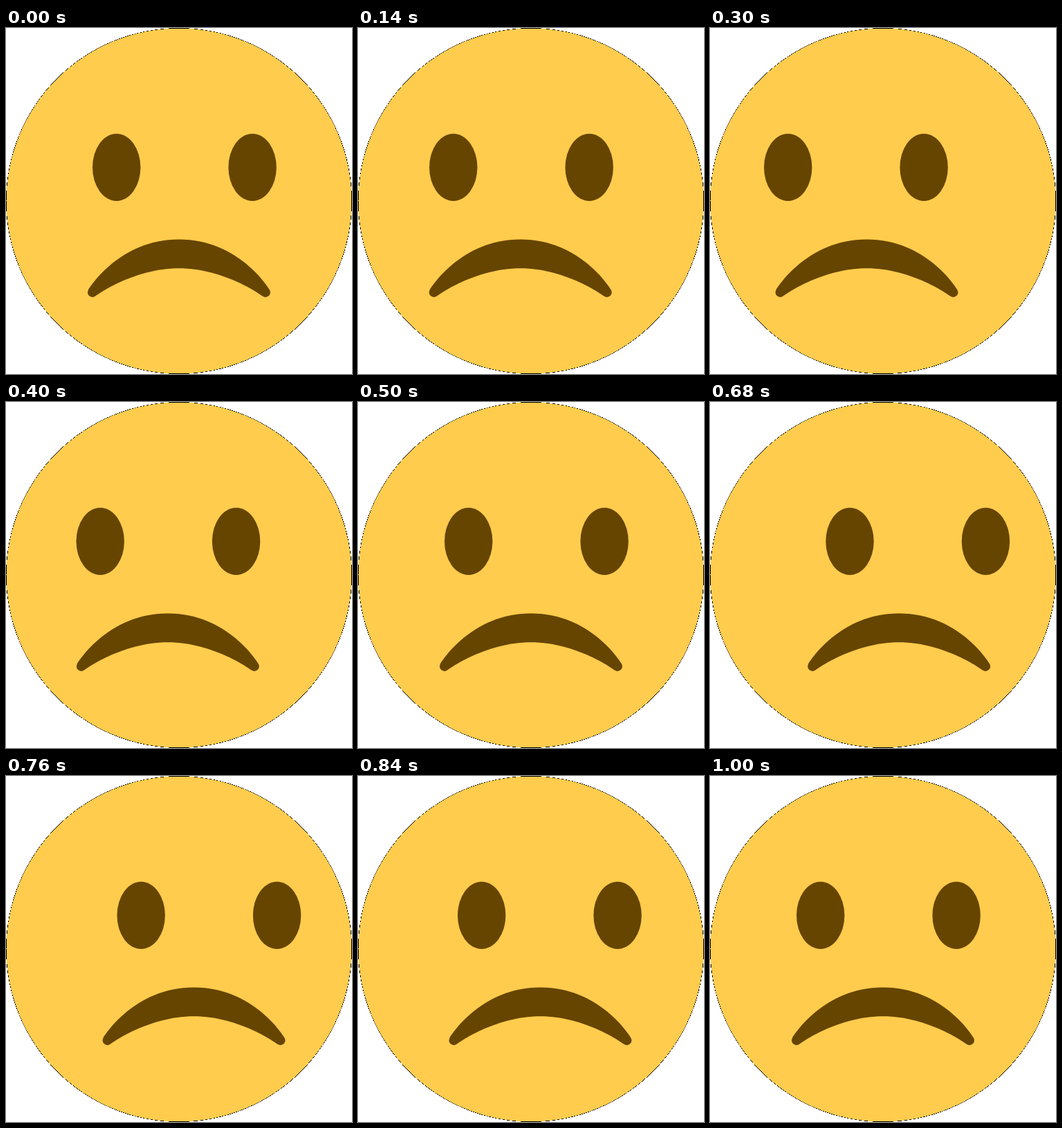
An HTML page for the animation above (2420 ms loop, 500x500 px).

```html
<!DOCTYPE html>
<html lang="en">
<head>
<meta charset="utf-8">
<title>Frowning face shaking its head</title>
<style>
  html, body { margin: 0; width: 100%; height: 100%; overflow: hidden; background: #fff; }
  svg { display: block; width: 100%; height: 100%; }
</style>
</head>
<body>
<svg viewBox="0 0 500 500">
  <g shape-rendering="crispEdges">
    <circle cx="250" cy="250" r="250"/>
    <circle cx="250" cy="250" r="249.5" fill="#ffcc4d"/>
  </g>
  <g fill="#664500">
    <g id="eyes">
      <ellipse cx="159.7" cy="201.4" rx="34.7" ry="48.6"/>
      <ellipse cx="356.1" cy="201.4" rx="34.7" ry="48.6"/>
    </g>
    <g id="mouth">
      <path transform="scale(13.889)" d="M8.665 27.871c.178.161.444.171.635.029
        .039-.029 3.922-2.9 8.7-2.9 4.766 0 8.662 2.871 8.7 2.9
        .191.142.457.13.635-.029.177-.16.217-.424.094-.628
        C27.3 27.029 24.212 22 18 22s-9.301 5.028-9.429 5.243
        c-.123.205-.084.468.094.628z"/>
    </g>
  </g>
</svg>
<script>
  const LOOP = 2420, STEP = 20;
  const EYE_SWING = 47, MOUTH_SWING = 23.5;
  const eyes = document.getElementById('eyes');
  const mouth = document.getElementById('mouth');

  // Head turn: -1 is fully left, 1 is fully right.
  function turnAt(ms) {
    if (ms < 300) return -ms / 300;
    if (ms < 700) return (ms - 500) / 200;
    if (ms >= 1000) return 0;
    const p = (ms - 700) / 300;
    return 1 - (1.1 * p + 0.8 * p ** 2 - 0.9 * p ** 3);
  }

  function shift(part, x) {
    part.setAttribute('transform', `translate(${x.toFixed(2)} 0)`);
  }

  const start = performance.now();

  function draw() {
    const elapsed = (performance.now() - start) % LOOP;
    const turn = turnAt(Math.floor(elapsed / STEP) * STEP);
    shift(eyes, EYE_SWING * turn);
    // The mouth slows down towards either side.
    shift(mouth, MOUTH_SWING * (1.5 * turn - 0.5 * turn ** 3));
    requestAnimationFrame(draw);
  }
  draw();
</script>
</body>
</html>
```
